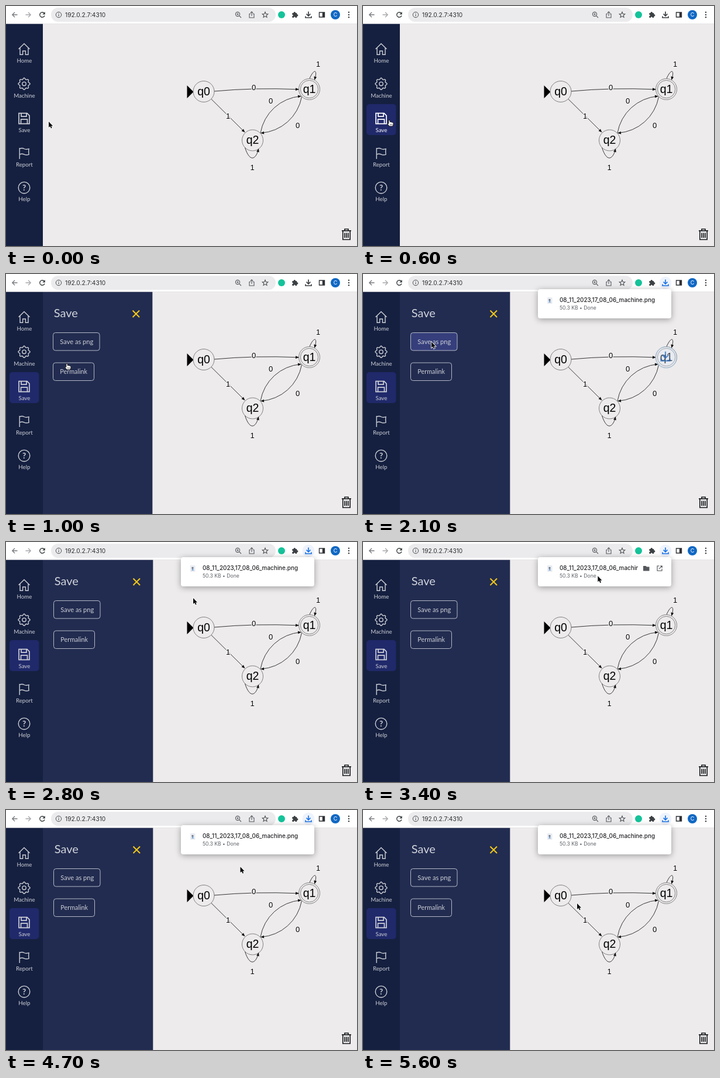
An HTML page with a canvas that plays this animation: 600 by 411 pixels, repeating every 5.7 s.

```html
<!DOCTYPE html>
<html lang="en">
<head>
<meta charset="utf-8">
<title>State machine editor</title>
<style>
html, body { margin: 0; width: 100%; height: 100%; overflow: hidden; background: #edebec; }
canvas { display: block; width: 600px; height: 411px; }
</style>
</head>
<body>
<canvas id="stage"></canvas>
<script>
const W = 600, H = 411, LOOP = 5700, STEP = 100;
const UI = 'Lato, sans-serif', SYS = 'Inter, sans-serif', GRAPH = '"Liberation Sans", Arial, sans-serif';
const PAPER = '#edebec', INK = '#cdcfd6', BLUE = '#1a73e8', DARK = '#3c4043';
const canvas = document.getElementById('stage');
const g = canvas.getContext('2d');
const dpr = window.devicePixelRatio || 1;
canvas.width = W * dpr;
canvas.height = H * dpr;

// Pointer path: time, x, y
const PATH = [
  [0, 73, 198], [200, 67, 198], [400, 49, 197], [600, 45, 195], [800, 45, 195],
  [1000, 104, 153], [1200, 115, 126], [1400, 117, 117], [2400, 117, 116],
  [2600, 205, 107], [2800, 320, 96], [3000, 352, 85], [3300, 396, 61],
  [3600, 412, 53], [4000, 414, 52], [4300, 416, 55], [4600, 406, 86],
  [5000, 384, 131], [5400, 367, 158], [5600, 366, 160], [5700, 366, 160]
];

function pointer(t) {
  const i = PATH.findIndex(p => p[0] > t);
  const a = PATH[i - 1], b = PATH[i];
  const k = (t - a[0]) / (b[0] - a[0]);
  return { x: a[1] + (b[1] - a[1]) * k, y: a[2] + (b[2] - a[2]) * k };
}

// cubic-bezier(.25, .1, .25, 1)
function ease(x) {
  if (x <= 0) return 0;
  if (x >= 1) return 1;
  const at = (p, q, s) => 3 * (1 - s) * (1 - s) * s * p + 3 * (1 - s) * s * s * q + s * s * s;
  let lo = 0, hi = 1;
  for (let i = 0; i < 24; i++) {
    const mid = (lo + hi) / 2;
    if (at(.25, .25, mid) < x) lo = mid; else hi = mid;
  }
  return at(.1, 1, lo);
}

const inside = (p, x0, y0, x1, y1) => p.x >= x0 && p.x <= x1 && p.y >= y0 && p.y <= y1;

function text(s, x, y, size, family, color, align = 'left', weight = 400) {
  g.font = `${weight} ${size}px ${family}`;
  g.textAlign = align;
  g.fillStyle = color;
  g.fillText(s, x, y);
}

function stroke(d, color, width = 1) {
  g.strokeStyle = color;
  g.lineWidth = width;
  g.stroke(new Path2D(d));
}

function fill(d, color) {
  g.fillStyle = color;
  g.fill(new Path2D(d));
}

function box(x, y, w, h, r, color, line) {
  g.beginPath();
  g.roundRect(x, y, w, h, r);
  if (color) { g.fillStyle = color; g.fill(); }
  if (line) { g.strokeStyle = line; g.lineWidth = 1; g.stroke(); }
}

function disc(x, y, r, color, line, width = 1) {
  g.beginPath();
  g.arc(x, y, r, 0, 2 * Math.PI);
  if (color) { g.fillStyle = color; g.fill(); }
  if (line) { g.strokeStyle = line; g.lineWidth = width; g.stroke(); }
}

function at(x, y, draw, scale = 1) {
  g.save();
  g.translate(x, y);
  g.scale(scale, scale);
  draw();
  g.restore();
}

function download(color, width = 1.7) {
  stroke('M0-5.5V1.5M-3.5-1.5L0 2L3.5-1.5M-5 2.5V5H5V2.5', color, width);
}

function toolbar(saved) {
  g.fillStyle = '#fff';
  g.fillRect(0, 0, W, 30);
  g.fillStyle = '#e3e2e4';
  g.fillRect(0, 30, W, .7);
  at(15, 15, () => stroke('M4.5 0H-4M0-4.2L-4.2 0L0 4.2', '#77797c', 1.3));
  at(38, 15, () => stroke('M-4.5 0H4M0-4.2L4.2 0L0 4.2', '#a6a8ab', 1.3));
  at(62, 15, () => {
    g.beginPath();
    g.arc(0, 0, 4.2, .35, 5.6);
    g.strokeStyle = DARK;
    g.lineWidth = 1.5;
    g.stroke();
    fill('M4.8-5V-.6H.4Z', DARK);
  });
  box(77, 3, 384, 24, 12, '#ebebed');
  disc(90, 15, 4.7, null, '#4b4e52', 1);
  stroke('M90 14.4V17.6M90 12.3V13.4', '#4b4e52', 1.1);
  text('192.0.2.7:4310', 101, 18.8, 10.2, SYS, '#292b2e');
  at(396, 14, () => {
    disc(0, 0, 3.6, null, '#55585c', 1.1);
    stroke('M2.6 2.6L6 6M-1.8 0H1.8M0-1.8V1.8', '#55585c', 1.1);
  });
  at(420, 15, () => stroke('M-2-1.5H-4V5H4V-1.5H2M0 2V-5.2M-2.4-2.9L0-5.3L2.4-2.9', '#55585c', 1.1));
  at(443, 15.3, () => {
    g.beginPath();
    for (let i = 0; i < 10; i++) {
      const a = -Math.PI / 2 + i * Math.PI / 5, r = i % 2 ? 2.3 : 5.1;
      g.lineTo(r * Math.cos(a), r * Math.sin(a));
    }
    g.closePath();
    g.strokeStyle = '#4b4e52';
    g.lineWidth = 1.1;
    g.stroke();
  });
  disc(471, 15, 6, '#15c39a');
  at(494, 15, () => {
    box(-4.8, -3, 8.2, 8, 1, DARK);
    disc(-.7, -3.4, 1.7, DARK);
    disc(3.7, .9, 1.7, DARK);
    disc(-4.6, 1, 1.3, '#fff');
    disc(-.7, 4.9, 1.3, '#fff');
  });
  if (saved) disc(517, 15, 10.5, '#eef3fc');
  at(517, 15, () => download(saved ? BLUE : DARK));
  at(540, 15, () => {
    stroke('M-4.5-4H4.5V4H-4.5Z', '#303236', 1.4);
    fill('M.8-4H4.5V4H.8Z', '#303236');
  });
  disc(563, 15, 8, '#1068c4');
  text('C', 563, 18.3, 9, SYS, '#fff', 'center');
  for (const y of [10.8, 15, 19.2]) disc(586, y, 1.2, DARK);
}

function edge(d, x, y, angle) {
  stroke(d, '#222', .9);
  at(x, y, () => {
    g.rotate(angle);
    fill('M0 0L-6-2.4V2.4Z', '#111');
  });
}

function node(name, x, y, final) {
  disc(x, y, 18, PAPER, '#666', .8);
  if (final) disc(x, y, 15.2, null, '#666', .8);
  text(name, x, y + 6.2, 19.5, GRAPH, '#000', 'center');
}

function tag(s, x, y) {
  g.font = `13px ${GRAPH}`;
  g.textAlign = 'center';
  g.strokeStyle = '#f4f2f3';
  g.lineWidth = 2.5;
  g.strokeText(s, x, y + 4.6);
  text(s, x, y + 4.6, 13, GRAPH, '#000', 'center');
}

function machine() {
  g.fillStyle = PAPER;
  g.fillRect(0, 30, W, H - 30);
  fill('M309.5 136V158L320.5 147Z', '#000');
  node('q0', 338, 146.5);
  node('q1', 518.5, 142.5, true);
  node('q2', 421.5, 230);
  edge('M356 146Q425 139.5 500 142.8', 501, 142.8, .04);
  edge('M351 159.5L408 216', 408.5, 216.5, .78);
  edge('M435 217.5A76 76 0 0 1 504 154.5', 505, 154.4, -.08);
  edge('M505.5 155.5A76 76 0 0 1 436 217.5', 435, 217.7, 3.06);
  edge('M519 124C527 106 533 110 527.6 125', 527.3, 127, 1.82);
  edge('M408.5 242.5C416 266 426 265 431.5 246', 432, 244, -1.3);
  tag('0', 423.5, 139.5);
  tag('1', 379.5, 188);
  tag('0', 452.5, 162.5);
  tag('0', 498.7, 204.5);
  tag('1', 533.5, 99);
  tag('1', 421, 276);
  at(582, 391, () => {
    stroke('M-8-6.2H8M-3-6.5V-9H3V-6.5M-6.2-6V9H6.2V-6M-2.9-2.5V6M0-2.5V6M2.9-2.5V6', '#1d1f22', 1.7);
  });
}

function panel(open, hover) {
  if (open <= 0) return;
  const width = 188.3;
  g.save();
  g.beginPath();
  g.rect(63, 30, W, H);
  g.clip();
  g.translate(width * (open - 1), 0);
  g.fillStyle = '#222c50';
  g.fillRect(63, 30, width, H - 30);
  text('Save', 82.7, 74, 20, UI, '#d0d3db');
  stroke('M217.5 62.5L229 74M229 62.5L217.5 74', '#f6c915', 2);
  box(81.5, 100.5, 79.5, 30.5, 4, hover ? '#363f7c' : null, '#b4b8c6');
  text('Save as png', 93.3, 119.7, 11.1, UI, INK);
  box(81.5, 152, 70, 30.5, 4, null, '#b4b8c6');
  text('Permalink', 93.3, 171.2, 10.8, UI, INK);
  g.restore();
}

const icons = {
  Home(c) { stroke('M-9.5-.3L0-9.5L9.5-.3M-7-2.5V9.3H-2.4V3H2.4V9.3H7V-2.5', c, 1.4); },
  Machine(c) {
    g.beginPath();
    for (let i = 0; i < 96; i++) {
      const a = i * Math.PI / 48, r = 8.9 + 1.1 * Math.cos(8 * a);
      g.lineTo(r * Math.cos(a), r * Math.sin(a));
    }
    g.closePath();
    g.strokeStyle = c;
    g.lineWidth = 1.4;
    g.stroke();
    disc(0, 0, 3.2, null, c, 1.4);
  },
  Save(c) { stroke('M-9-9H5L9-5V9H-9ZM-5-9V-3.5H4V-9M-5.5 9V1.5H5.5V9', c, 1.7); },
  Report(c) { stroke('M-7.8 10V-9M-7.8-7.5C-4.5-8.8-2-8.5 0-7.4S5-6.2 8-7.2Q7.2-2.5 8 2.5C5 3.4 2 3.2 0 2.2S-4.5 .8-7.8 2.2', c, 1.4); },
  Help(c) {
    disc(0, 0, 9.8, null, c, 1.4);
    text('?', 0, 4.7, 13.5, UI, c, 'center', 700);
  }
};

function sidebar(active, hover) {
  g.fillStyle = '#152040';
  g.fillRect(0, 30, 63, H - 30);
  if (active) box(6, 168, 50.5, 53, 5, '#20296a');
  Object.keys(icons).forEach((name, i) => {
    const y = 74 + i * 59.3;
    const color = hover && name === 'Save' ? '#fff' : INK;
    at(31, y, () => icons[name](color));
    text(name, 31.4, y + 23.2, 9.7, UI, color, 'center');
  });
}

function flyer(t) {
  const k = (t - 2000) / 300;
  if (k < 0 || k >= 1) return;
  g.save();
  at(518, 159 - 48 * k, () => {
    g.globalAlpha = .5 * (1 - k);
    disc(0, 0, 18, '#dcebf8', '#a9cff0', 2);
    g.globalAlpha = 1 - k;
    at(-1, -2, () => download('#1a62b8', 1.5), 1.5);
  });
  g.restore();
}

function popup(hover) {
  g.save();
  g.shadowColor = 'rgba(0,0,0,.35)';
  g.shadowBlur = 11 * dpr;
  g.shadowOffsetY = 2 * dpr;
  box(299, 26, 228, 50, 4, '#fff');
  g.restore();
  box(315, 40, 8.5, 11, 1, '#e8ebf0');
  disc(319, 44.5, 1.7, '#6b7a90');
  fill('M317 48.5L319 46L321.5 48.5Z', '#5b8fc8');
  g.save();
  if (hover) {
    g.beginPath();
    g.rect(330, 36, 140, 16);
    g.clip();
  }
  text('08_11_2023,17_08_06_machine.png', 336, 47.7, 9.9, SYS, '#202124', 'left', 500);
  g.restore();
  text('50.3 KB • Done', 336, 61, 8.6, SYS, '#5f6368');
  if (hover) {
    fill('M479 41H483.5L485 42.5H489.5V49.5H479Z', '#55585c');
    stroke('M506.5 41H503V49.2H511V45.8M508 41H511.2V44.2M511 41.2L506 46.2', '#4b4e52', 1.1);
  }
}

function arrow() {
  const d = 'M0 0V10L2.3 8L4 11.6L5.7 10.8L4.1 7.4H7.2Z';
  stroke(d, '#fff', 1.6);
  fill(d, '#0b0b0b');
}

function hand() {
  const d = 'M-1.2 6V.8Q0-.6 1.2 .8V3.6Q2.4 2.8 3.2 4Q4.6 3.4 5.2 4.6Q6.8 4.2 7 5.8V8L5.6 11H.2L-3.2 7Q-2.8 5-1.2 6.4Z';
  fill(d, '#fff');
  stroke(d, '#111', 1);
  stroke('M1.5 7V9.3M3.2 7V9.3M4.9 7V9.3', '#111', .6);
}

function draw(t) {
  const p = pointer(t);
  const open = ease((t - 638) / 400);
  const saved = t >= 2000;
  const onSave = inside(p, 6, 168, 56, 221);
  const onPng = open === 1 && inside(p, 81, 100, 161, 131);
  const onLink = open > .5 && inside(p, 81, 152, 152, 183);
  g.setTransform(dpr, 0, 0, dpr, 0, 0);
  machine();
  panel(open, onPng);
  sidebar(onSave || open > 0, onSave);
  flyer(t);
  toolbar(saved);
  if (saved) popup(inside(p, 299, 26, 527, 76));
  at(p.x, p.y, (onSave || onPng || onLink) && t < 1900 ? hand : arrow);
}

const start = performance.now();
function tick() {
  const t = (performance.now() - start) % LOOP;
  draw(Math.floor(t / STEP) * STEP);
  requestAnimationFrame(tick);
}
tick();
</script>
</body>
</html>
```
